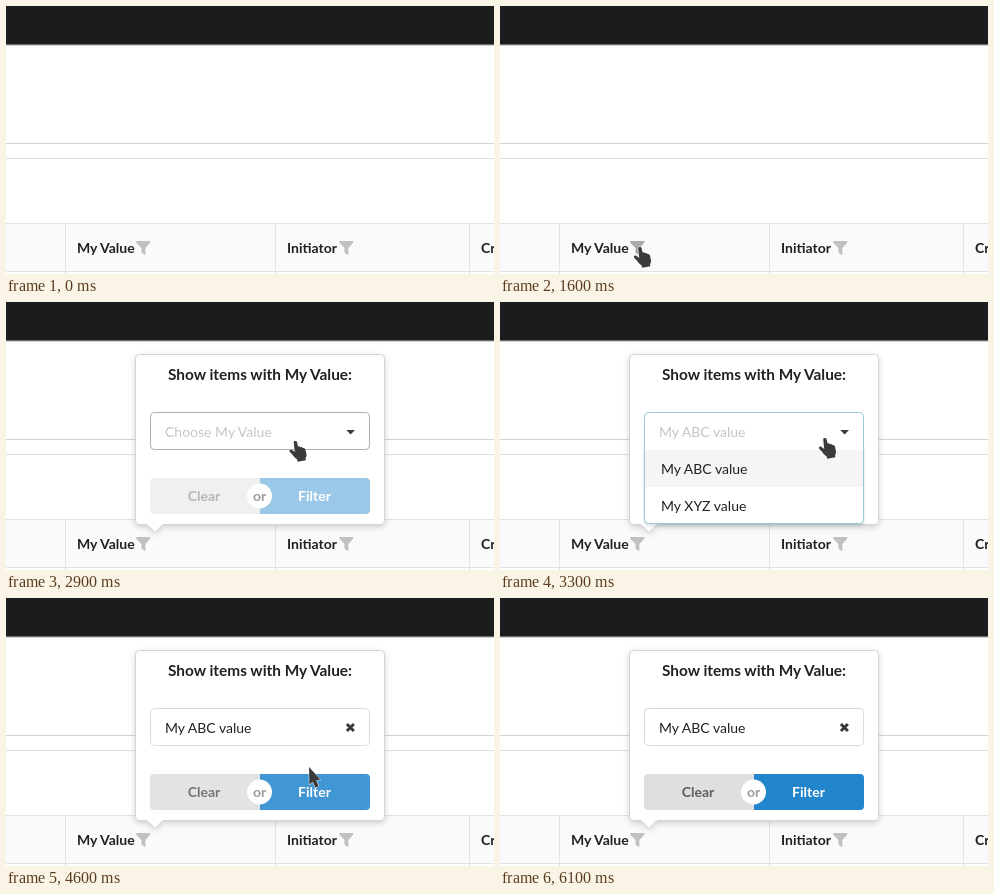
An HTML page that plays this animation: 488 px wide and 268 px high, repeating every 6600 ms.

```html
<!DOCTYPE html>
<html lang="en">
<head>
<meta charset="utf-8">
<title>Column filter</title>
<style>
  html, body { margin: 0; width: 100%; height: 100%; overflow: hidden; background: #fff; }
  svg { display: block; width: 488px; height: 268px; }
  text { font: 14px Lato, sans-serif; fill: #212121; }
  .b { font-weight: 700; }
  .mid { text-anchor: middle; }
  #pop { filter: drop-shadow(0 2px 3px rgba(34, 36, 38, .2)); }
  #menu { filter: drop-shadow(0 2px 1.5px rgba(34, 36, 38, .15)); }
</style>
</head>
<body>
<svg viewBox="0 0 488 268">
  <defs>
    <path id="funnel" d="M.6 0H13.9Q15 .8 14.2 1.8L9.4 7V13.4Q9 14.3 8.2 13.7L5.4 11.5V7L.4 1.8Q-.4.8.6 0Z"/>
  </defs>

  <rect width="488" height="268" fill="#fff"/>
  <rect width="488" height="38" fill="#1b1c1d"/>
  <rect y="38" width="488" height="1" fill="#6f6f6e"/>
  <rect y="39" width="488" height="1" fill="#cfcfcf"/>
  <rect y="137" width="488" height="1" fill="#d4d4d5"/>
  <rect y="152" width="488" height="1" fill="#dededf"/>
  <rect y="217" width="488" height="49" fill="#f9fafb"/>
  <path d="M0 217.5H488M0 265.5H488M59.5 217V268M269.5 217V268M463.5 217V268" stroke="#e1e2e3"/>
  <text class="b" x="71" y="247">My Value</text>
  <text class="b" x="281" y="247">Initiator</text>
  <text class="b" x="475" y="247">Created</text>
  <use id="hot" href="#funnel" x="130" y="235"/>
  <use href="#funnel" x="333" y="235" fill="#c1c1c2"/>

  <g id="popup">
    <g id="pop">
      <rect x="129.5" y="52.5" width="249" height="170" rx="4" fill="#fff" stroke="#d4d4d5"/>
      <path d="M141.5 222.5L149 230L156.5 222.5" fill="#fff" stroke="#dcdcdd" stroke-width=".8"/>
      <rect x="141" y="220" width="16" height="3" fill="#fff"/>
    </g>
    <text class="b mid" x="254" y="78" style="font-size:15.4px">Show items with My Value:</text>

    <g id="buttons">
      <path d="M254 176H148a4 4 0 0 0-4 4v28a4 4 0 0 0 4 4H254Z" fill="#dedfe0"/>
      <path d="M254 176H360a4 4 0 0 1 4 4v28a4 4 0 0 1-4 4H254Z" fill="#2386cd"/>
      <text class="b mid" x="198" y="199" style="fill:#5d5e5f">Clear</text>
      <text class="b mid" x="308.5" y="199" style="fill:#fff">Filter</text>
    </g>
    <circle cx="253.5" cy="194" r="12.5" fill="#fff"/>
    <text class="b mid" x="253.7" y="199" style="fill:#9b9b9b">or</text>

    <rect id="field" x="144.5" y="110.5" width="219" height="37" rx="4" fill="#fff"/>
    <g id="menu">
      <path d="M144.5 143V217.5a4 4 0 0 0 4 4H359.5a4 4 0 0 0 4-4V143" fill="#fff" stroke="#96c8da"/>
      <rect x="145" y="148" width="218" height="37" fill="#f5f5f5"/>
      <text x="161" y="172">My ABC value</text>
      <text x="161" y="209">My XYZ value</text>
    </g>
    <text id="value" x="159" y="135"></text>
    <path id="caret" d="M340.3 128H349L344.6 132.6Z" fill="#3a3a3a"/>
    <path id="cross" d="M340.9 126L347.9 133M347.9 126L340.9 133" stroke="#3a3a3a" stroke-width="3"/>
  </g>

  <g id="cursor" fill="#3b3b3c" stroke="#fff" stroke-width="1" stroke-linejoin="round" paint-order="stroke">
    <path id="hand" transform="translate(-6.5 -.5)" d="M5.2 2.2C5.2.6 8 .4 8.5 2L9.6 6.6Q11 5.8 12 7.2Q13.6 6.6 14.4 8Q16.4 7.6 17 9.6L18 14.5Q18.2 16.5 17 18.2L17.4 20.2L9.2 21.8L8.6 19.6Q5.5 17.5 4 14.8L1 11.6C.2 10 2 8.8 3.4 9.8L6.2 12Z"/>
    <path id="arrow" d="M0 0L11.4 12.6L7.2 13.4L9.8 19.2L6.4 20.8L3.8 14.8L.4 17.6Z"/>
  </g>
</svg>

<script>
const LOOP = 6600, STEP = 100;
const $ = id => document.getElementById(id);
const clamp = v => Math.max(0, Math.min(1, v));
const part = (t, a, b) => clamp((t - a) / (b - a));
const smooth = k => k * k * (3 - 2 * k);
const easeOut = k => 1 - (1 - k) ** 2;
const show = (id, on) => $(id).setAttribute('display', on ? 'inline' : 'none');
const set = (id, name, v) => $(id).setAttribute(name, v);

// Pointer strokes: start, end, from, bend, to, easing
const strokes = [
  [1000, 1600, [60, 252], [110, 205], [139.5, 240.5], easeOut],
  [2200, 2900, [139.5, 240.5], [215, 185], [289, 138.5], smooth],
  [2900, 3300, [289, 138.5], [310, 136], [324.5, 135.5], easeOut],
  [3500, 3800, [324.5, 135.5], [312, 150], [303, 169], smooth],
  [5900, 6000, [303, 169], [360, 169], [417, 169], smooth]
];

function pointer(t) {
  const [a, b, p, c, q, ease] = strokes.filter(s => t >= s[0]).pop() || strokes[0];
  const k = ease(part(t, a, b)), m = 1 - k;
  return [0, 1].map(i => m * m * p[i] + 2 * m * k * c[i] + k * k * q[i]);
}

function draw(time) {
  const t = Math.floor(time / STEP) * STEP;
  const [x, y] = pointer(t);
  const open = t >= 2000, chosen = t >= 4600;
  const menu = t >= 3100 && !chosen;
  const onFunnel = x > 130 && x < 145 && y > 234 && y < 250;
  const onField = open && x > 144 && x < 364 && y > 110 && y < 148;
  const hand = onFunnel || onField || menu;

  show('cursor', t >= 1000 && t < 6100);
  set('cursor', 'transform', `translate(${x} ${y})`);
  show('hand', hand);
  show('arrow', !hand);

  const grey = Math.round(193 - 23 * part(t, 1300, 1600) * (1 - part(t, 2300, 2700)));
  set('hot', 'fill', `rgb(${grey},${grey},${grey})`);

  show('popup', open);
  set('popup', 'opacity', t < 2100 ? .98 : 1);
  set('field', 'stroke', menu ? '#96c8da' : onField && !chosen ? '#aeafb0' : '#dadadb');

  const drop = easeOut(part(t, 3000, 3300));
  show('menu', menu);
  set('menu', 'transform', `translate(0 143) scale(1 ${drop}) translate(0 -143)`);
  set('menu', 'opacity', drop);

  $('value').textContent = menu || chosen ? 'My ABC value' : 'Choose My Value';
  $('value').style.fill = chosen ? '#212121' : '#c5c5c5';
  show('caret', !chosen);
  show('cross', chosen);
  set('buttons', 'opacity', chosen ? .86 + .14 * easeOut(part(t, 4600, 4800)) : .45);
}

function tick(now) {
  draw(now % LOOP);
  requestAnimationFrame(tick);
}
draw(0);
requestAnimationFrame(tick);
</script>
</body>
</html>
```
